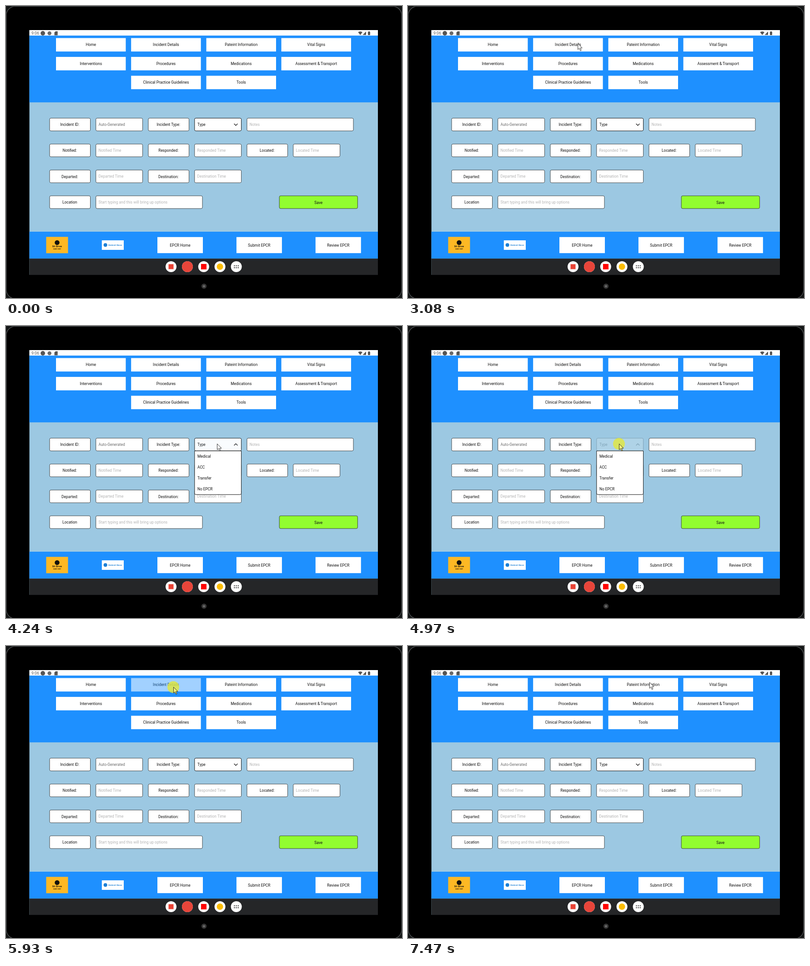
Recreate the animation shown at these times as an HTML page. Size 871 by 643 pixels, loop 8 s.

```html
<!DOCTYPE html>
<html lang="en">
<head>
<meta charset="utf-8">
<title>Incident form</title>
<style>
html, body { margin: 0; width: 100%; height: 100%; overflow: hidden; background: #141616; }
svg { display: block; width: 871px; height: 643px; }
text { font: 8.4px Roboto, Arial, sans-serif; fill: #111; }
.mid { text-anchor: middle; }
.hint { fill: #b4b4b4; }
.field { fill: #fff; stroke: #222; stroke-width: .8; }
.line { fill: none; stroke: #222; stroke-width: 1.3; }
</style>
</head>
<body>
<svg id="stage" viewBox="0 0 871 643"></svg>
<script>
const LOOP = 8000;
const stage = document.getElementById('stage');

function add(tag, attrs = {}, parent = stage, content = '') {
  const el = document.createElementNS('http://www.w3.org/2000/svg', tag);
  for (const key in attrs) el.setAttribute(key, attrs[key]);
  el.textContent = content;
  parent.append(el);
  return el;
}
const group = () => add('g');
const rect = (x, y, width, height, fill, parent) => add('rect', { x, y, width, height, fill }, parent);
const circle = (cx, cy, r, fill, parent) => add('circle', { cx, cy, r, fill }, parent);
const path = (d, attrs, parent) => add('path', { d, ...attrs }, parent);
const label = (content, x, y, cls = '', parent, style = '') =>
  add('text', { x, y, class: cls, style }, parent, content);

function button(content, x, y, w, h, parent) {
  rect(x, y, w, h, '#fff', parent);
  label(content, x + w / 2, y + h / 2 + 3, 'mid', parent);
}
function field(x, y, width, parent, style = '') {
  add('rect', { x, y, width, height: 28, rx: 2.8, class: 'field', style }, parent);
}
function caption(content, x, y) {
  field(x, y, 89.5);
  label(content, x + 44.2, y + 17.3, 'mid');
}
function input(content, x, y, w = 102.8, style = '') {
  field(x, y, w);
  label(content, x + 5.8, y + 17.1, 'hint', stage, style);
}

// Tablet body and screen areas
add('rect', { x: .6, y: .6, width: 869.6, height: 644, rx: 20, fill: '#000', stroke: '#55585a', 'stroke-width': 1.2 });
circle(435.5, 617, 5.8, '#343434');
circle(435.5, 617, 2.6, '#686868');
rect(51.5, 53, 766.5, 539, '#9cc8e2');
rect(51.5, 53, 766.5, 12.3, '#fff');
rect(51.5, 65.2, 766.5, 147, '#1e90ff');
rect(51.5, 497, 766.5, 59.3, '#1e90ff');
rect(51.5, 556.2, 766.5, 36, '#252628');

// Status bar
label('9:06', 56, 63, '', stage, 'font-size:8.8px;fill:#5c5c5c');
circle(81, 60, 4.9, '#555');
circle(95.6, 60, 4.3, '#6a6a6a');
path('M106.5 58.2L109 55.7H113.6V64.4H106.5Z', { fill: '#555' });
path('M774.3 57.6Q779.2 54.2 784 57.6L779.2 64Z', { fill: '#555' });
path('M784.6 63.8H792V56Z', { fill: '#555' });
path('M796 56.8H797.4V55.8H799.6V56.8H801V64H796Z', { fill: '#555' });

// Navigation
const columns = [110, 275.2, 440.6, 605.6];
const details = group();
[
  ['Home', 0, 0], ['Incident Details', 1, 0], ['Pateint Information', 2, 0], ['Vital Signs', 3, 0],
  ['Interventions', 0, 1], ['Procedures', 1, 1], ['Medications', 2, 1], ['Assessment & Transport', 3, 1],
  ['Clinical Practice Guidelines', 1, 2], ['Tools', 2, 2]
].forEach(([name, col, row]) =>
  button(name, columns[col], 70.6 + row * 41.5, 153.4, 29.6, name === 'Incident Details' ? details : stage));

// Form
const rows = [247, 304, 361.2, 418];
caption('Incident ID:', 96, rows[0]);
input('Auto-Generated', 197.7, rows[0], 102.8, 'fill:#6c6c6c');
caption('Incident Type:', 313, rows[0]);
input('Notes', 530, rows[0], 234);
caption('Notified:', 96, rows[1]);
input('Notified Time', 197.7, rows[1]);
caption('Responded:', 313, rows[1]);
input('Responded Time', 414.8, rows[1]);
caption('Located:', 530, rows[1]);
input('Located Time', 631.8, rows[1]);
caption('Departed:', 96, rows[2]);
input('Departed Time', 197.7, rows[2]);
caption('Destination:', 313, rows[2]);
input('Destination Time', 414.8, rows[2]);
caption('Location', 96, rows[3]);
input('Start typing and this will bring up options', 197.7, rows[3], 234.3);
field(601.2, rows[3], 172.2, stage, 'fill:#92fd30');
label('Save', 687.2, 435.5, 'mid');

const picker = group();
field(414.8, rows[0], 102.8, picker, 'stroke:#111;stroke-width:1');
label('Type', 421, 264.2, '', picker);
const arrowDown = path('M501.6 259.2L505.5 263L509.4 259.2', { class: 'line' }, picker);
const arrowUp = path('M501.6 263L505.5 259.2L509.4 263', { class: 'line' }, picker);

const menu = group();
path('M414.8 275H517.6V368.3Q517.6 371.2 514.7 371.2H417.7Q414.8 371.2 414.8 368.3Z',
  { class: 'field', style: 'stroke:#111;stroke-width:1' }, menu);
['Medical', 'ACC', 'Transfer', 'No EPCR'].forEach((name, i) => label(name, 421, 290.4 + i * 24, '', menu));

// Footer
rect(88.4, 508.4, 48, 36, '#fdb824');
circle(112.4, 521, 5.3, '#15120c');
label('St Orve', 112.4, 530.8, 'mid', stage, 'font:bold 5px "DejaVu Sans",sans-serif');
label('CARE UNIT', 112.4, 536.4, 'mid', stage, 'font:bold 2.9px "DejaVu Sans",sans-serif');
rect(210.8, 516, 48.2, 21, '#fff');
circle(218.6, 526.3, 4, '#1b7fd6');
label('Ombrel-Nova', 240, 528.2, 'mid', stage, 'font:bold 4.1px "DejaVu Sans",sans-serif;fill:#2787d8');
['EPCR Home', 'Submit EPCR', 'Review EPCR'].forEach((name, i) => button(name, 333 + i * 173.9, 508.8, 100, 35.4));

// Dock
[363, 399, 434.8, 470.6, 506.6].forEach(x => circle(x, 574, 12, '#fff'));
rect(357.5, 568.5, 11, 11, '#ea4335');
circle(399, 574, 12, '#e8453a');
rect(429, 568, 12, 12, '#f00');
circle(470.6, 574, 7, '#fbbc04');
for (let i = 0; i < 6; i++) circle(502.4 + i % 3 * 4.2, 572 + Math.floor(i / 3) * 4.2, 1.3, '#4a4a4a');

// Pointer
const pointer = group();
const halo = circle(0, .5, 13, 'rgba(224,230,62,.82)', pointer);
const arrow = path('M.5 .5V13.6L3.6 10.8L5.8 16.2L8 15.2L5.8 10.1H10Z',
  { fill: '#fff', stroke: '#222', 'stroke-width': .9 }, pointer);

// Each table row: time, value, optional easing towards the next row
function play(el, prop, table, easing = 'linear') {
  const frames = [[0, table[0][1]], ...table, [LOOP, table[table.length - 1][1]]].map(([time, value, ease]) =>
    ({ offset: time / LOOP, [prop]: value, easing: ease || easing }));
  el.animate(frames, { duration: LOOP, iterations: Infinity });
}
const toggle = (el, table) => play(el, 'opacity', table, 'step-end');

const moves = [
  [260, 655, 632], [340, 610, 560], [420, 552, 470], [500, 482, 378], [580, 415, 300],
  [660, 362, 238], [730, 338, 190], [800, 342, 148], [870, 350, 112], [950, 351, 106],
  [1040, 351, 106], [1150, 373, 82], [3060, 373, 82, 'ease-in-out'], [3800, 464, 259],
  [5090, 464, 259], [5180, 450, 225], [5390, 394.5, 127.5], [5530, 375, 98], [5700, 366, 89], [5860, 368, 90],
  [6230, 368, 90], [6350, 378, 108], [6560, 430, 190], [6700, 457, 241],
  [6780, 473, 268], [6880, 500, 293], [6960, 522, 299], [7050, 543, 270], [7140, 547, 215],
  [7230, 541, 148], [7320, 534, 88], [7390, 531, 72], [7470, 530.7, 79.5]
];
play(pointer, 'transform', moves.map(([t, x, y, ease]) => [t, `translate(${x}px, ${y}px)`, ease]));
toggle(pointer, [[0, 0], [260, 1]]);

const presses = [[3840, 3975], [4890, 5105], [5850, 5995]];
toggle(halo, [[0, 0], ...presses.flatMap(([down, up]) => [[down, 1], [up, 0]])]);
play(arrow, 'fill', [[0, '#fff'], ...presses.flatMap(([down, up]) => [[down, '#faf27c'], [up, '#fff']])], 'step-end');

const dim = (down, up) => [
  [down, 1, 'ease-in-out'], [down + 120, .2], [up, .2, 'ease-in-out'], [up + 250, 1]
];
play(picker, 'opacity', [...dim(3855, 4040), ...dim(4845, 5090)]);
play(details, 'opacity', dim(5870, 5992));

const opened = [[0, 0], [4040, 1], [5105, 0]];
toggle(menu, opened);
toggle(arrowUp, opened);
toggle(arrowDown, opened.map(([t, v]) => [t, 1 - v]));
</script>
</body>
</html>
```
